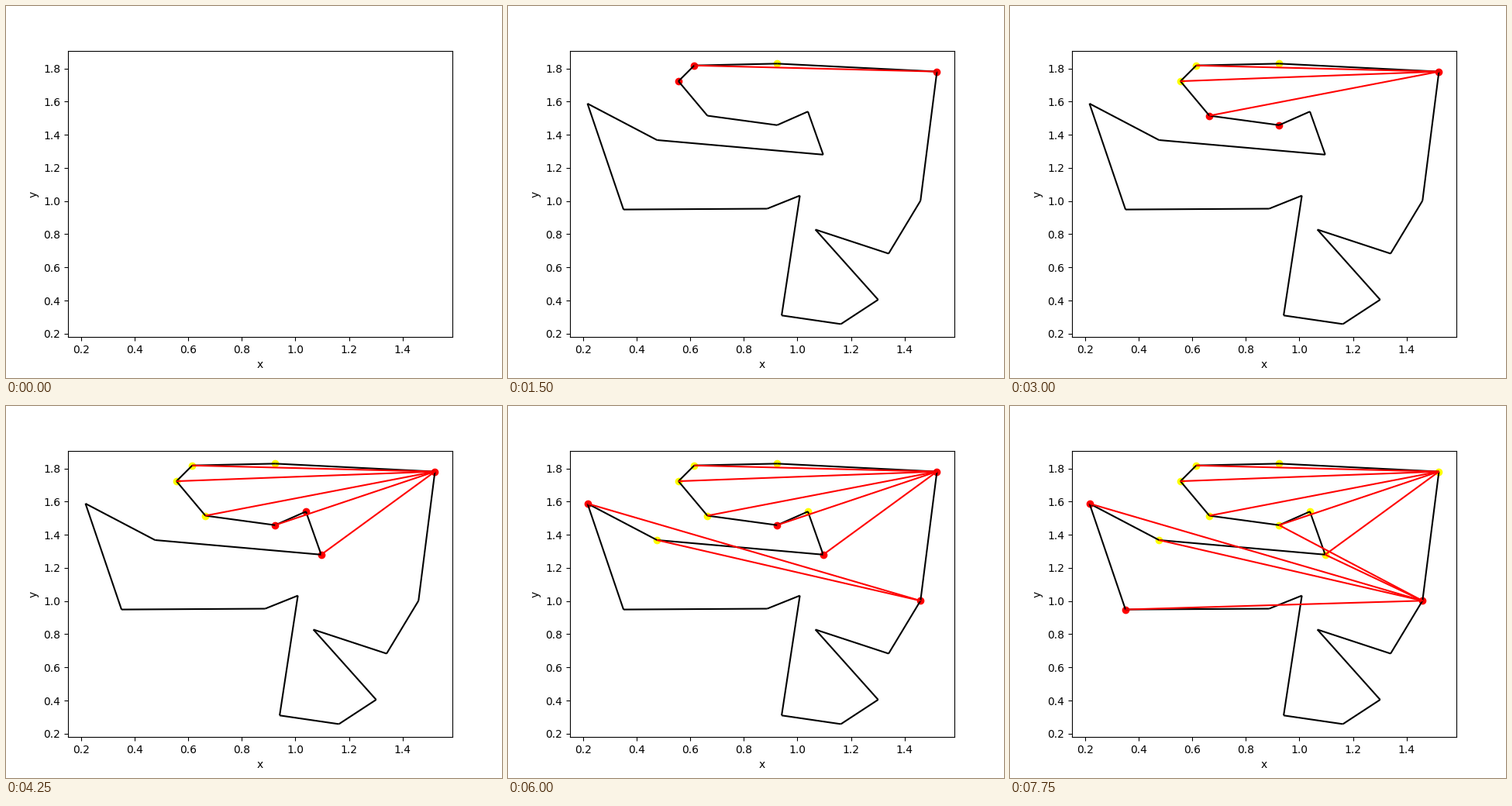
A matplotlib script that plays this animation: 640 by 480 pixels, repeating every 8 s.

```python
import matplotlib.pyplot as plt
import numpy as np
from matplotlib.animation import FuncAnimation
from matplotlib.collections import LineCollection

# Polygon corners in boundary order
CORNERS = {
    "A": (0.924, 1.829), "B": (0.615, 1.818), "D": (0.556, 1.723),
    "G": (0.664, 1.515), "H": (0.924, 1.458), "F": (1.039, 1.540),
    "J": (1.096, 1.280), "I": (0.476, 1.368), "E": (0.2166, 1.588),
    "K": (0.351, 0.949), "N": (0.887, 0.954), "M": (1.009, 1.033),
    "Q": (0.941, 0.310), "R": (1.162, 0.258), "S": (1.301, 0.405),
    "T": (1.067, 0.828), "U": (1.340, 0.683), "L": (1.459, 1.002),
    "C": (1.5203, 1.781),
}

# One step per frame: "+X" stacks corners, "-X" retires one, "XY" adds a diagonal
STEPS = ("poly +AB +C BC -A +D DC -B +G GC -D +H HC -G +F +J JC -F "
         "+I +E +L EL IL -I JL -J HL -H -C +K KL").split()

fig, ax = plt.subplots(figsize=(6.4, 4.8), dpi=100)
ax.set_xlim(0.1514, 1.5855)
ax.set_ylim(0.1795, 1.9074)
ax.set_xlabel("x")
ax.set_ylabel("y")

active = ax.scatter([], [], c="red")
done = ax.scatter([], [], c="yellow")
outline = ax.add_collection(LineCollection([], colors="black"), autolim=False)
diagonals = ax.add_collection(LineCollection([], colors="red"), autolim=False)

names = list(CORNERS)
EDGES = [(CORNERS[a], CORNERS[b]) for a, b in zip(names, names[1:] + names[:1])]


def place(dots, keys):
    dots.set_offsets(np.array([CORNERS[k] for k in keys]).reshape(-1, 2))


def draw(frame):
    red, yellow, lines, edges = [], [], [], []
    for step in STEPS[:frame]:
        if step == "poly":
            edges = EDGES
        elif step[0] == "+":
            red.extend(step[1:])
        elif step[0] == "-":
            red.remove(step[1])
            yellow.append(step[1])
        else:
            lines.append([CORNERS[k] for k in step])
    place(active, red)
    place(done, yellow)
    outline.set_segments(edges)
    diagonals.set_segments(lines)
    return active, done, outline, diagonals


anim = FuncAnimation(fig, draw, frames=len(STEPS) + 1, interval=250,
                     repeat=True, repeat_delay=0)
plt.show()
```
